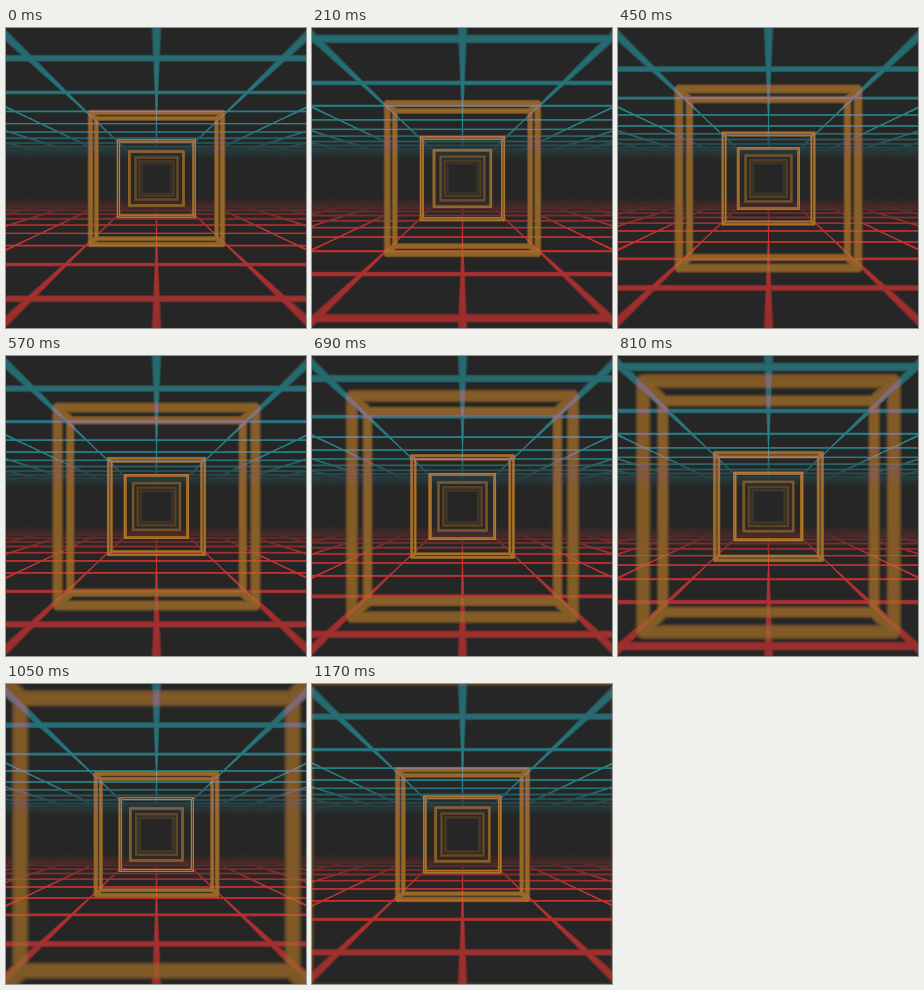
Animation of 300 by 300 pixels, one loop 1.2 s. Source, as an HTML page with a canvas:

```html
<!DOCTYPE html>
<html lang="en">
<head>
<meta charset="utf-8">
<title>Neon grid tunnel</title>
<style>
  html, body { margin: 0; width: 100%; height: 100%; overflow: hidden; background: #262626; }
  canvas { display: block; }
</style>
</head>
<body>
<canvas id="stage" width="300" height="300"></canvas>
<script>
const ctx = document.getElementById('stage').getContext('2d');
const LOOP = 1200, STEP = 30;
const FOCAL = 303;        // screen offset of the floor at depth 1
const FOCUS = 60;         // screen offset that is in sharp focus
const FRAME_SIZE = 188;   // half side of a frame at depth 1
const FRAME_DEPTH = 0.28;
const COLUMN = 1.055;     // grid column width relative to floor height
const BACKGROUND = [38, 38, 38];
const RED = [205, 50, 47], TEAL = [33, 134, 142], ORANGE = [184, 122, 38];

// Depth of field: lines widen and dim away from the focal plane.
const lineWidth = p => 1 + (p > FOCUS ? 0.105 : 0.04) * Math.abs(p - FOCUS);
const lineAlpha = p => {
  const fog = Math.min(1, Math.max(0, (p - 20) / 32));
  return fog * Math.min(1, Math.pow(1.5 / lineWidth(p), 0.2));
};

const mix = (color, amount) =>
  `rgb(${BACKGROUND.map((base, i) => Math.round(base + (color[i] - base) * amount))})`;

// Nested strokes, brighter towards the middle, give a soft edge.
function softStroke(color, p, trace) {
  const alpha = lineAlpha(p);
  if (alpha <= 0) return;
  const width = lineWidth(p);
  ctx.beginPath();
  trace();
  for (const [scale, share] of [[1.05, 0.3], [0.9, 0.6], [0.75, 0.85], [0.55, 1]]) {
    ctx.strokeStyle = mix(color, alpha * share);
    ctx.lineWidth = Math.max(1, width * scale);
    ctx.stroke();
  }
}

function segment(color, p, x1, y1, x2, y2) {
  softStroke(color, p, () => {
    ctx.moveTo(x1, y1);
    ctx.lineTo(x2, y2);
  });
}

function drawGrid(color, side, travel) {
  ctx.lineCap = 'butt';
  for (let z = (2.52 - travel + 2) % 1 + 1; z < 16; z++) {
    const p = FOCAL / z;
    if (p < 165) segment(color, p, -160, side * p, 160, side * p);
  }
  const step = 3;
  for (let k = -8; k <= 8; k++) {
    const slope = k * COLUMN;
    for (let p = 20; p < 165 && Math.abs(slope) * p < 170; p += step) {
      const q = p + step + 0.5;
      segment(color, p + step / 2, slope * p, side * p, slope * q, side * q);
    }
  }
}

function drawSquare(z) {
  const half = FRAME_SIZE / z;
  softStroke(ORANGE, FOCAL / z, () => ctx.rect(-half, -half, half * 2, half * 2));
}

function drawFrame(z) {
  const back = z + FRAME_DEPTH;
  drawSquare(back);
  drawSquare(z);
  const near = FRAME_SIZE / z, far = FRAME_SIZE / back;
  const p = FOCAL / (z + FRAME_DEPTH / 2);
  ctx.lineCap = 'round';
  for (const sx of [-1, 1]) {
    for (const sy of [-1, 1]) {
      segment(ORANGE, p, sx * near, sy * near, sx * far, sy * far);
    }
  }
}

function draw(progress) {
  const travel = progress * 2;
  ctx.setTransform(1, 0, 0, 1, 0, 0);
  ctx.globalCompositeOperation = 'source-over';
  ctx.fillStyle = mix(BACKGROUND, 1);
  ctx.fillRect(0, 0, 300, 300);
  ctx.translate(150.5, 150.5);
  ctx.globalCompositeOperation = 'lighten';
  ctx.lineJoin = 'round';
  drawGrid(TEAL, -1, travel);
  drawGrid(RED, 1, travel);
  for (let k = 5; k >= 0; k--) drawFrame(2.85 + 2 * k - travel);
}

const start = performance.now();
function tick() {
  const elapsed = (performance.now() - start) % LOOP;
  draw(Math.floor(elapsed / STEP) * STEP / LOOP);
  requestAnimationFrame(tick);
}
tick();
</script>
</body>
</html>
```
